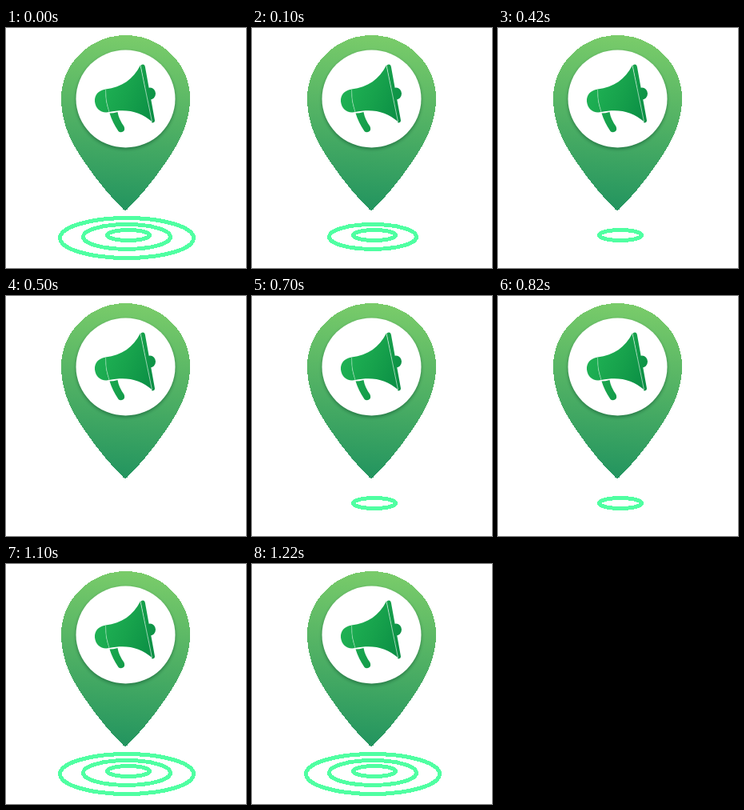
An HTML page with a canvas that plays this animation: 300x300 px, repeating every 1.3 s.

```html
<!DOCTYPE html>
<html lang="en">
<head>
<meta charset="utf-8">
<title>Map pin pulse</title>
<style>
  html, body { margin: 0; width: 100%; height: 100%; overflow: hidden; background: #fff; }
  canvas { display: block; width: 300px; height: 300px; }
</style>
</head>
<body>
<canvas id="stage" width="300" height="300"></canvas>
<script>
const SIZE = 300;
const LOOP = 1300;
const ctx = document.getElementById('stage').getContext('2d', { willReadFrequently: true });

const RINGS = [
  { x: 153, y: 259, rx: 26.5, ry: 6.5 },
  { x: 151, y: 261, rx: 54.5, ry: 15.5 },
  { x: 151, y: 262.5, rx: 83.5, ry: 25 }
];

const PIN = new Path2D(
  'M149.5 9 C194 9 230 45 230 88 C230 112 221 134 210 152 ' +
  'C192 181 172 206 151 227 Q149 229 147 227 ' +
  'C126 206 106 181 88 152 C77 134 69 112 69 88 C69 45 105 9 149.5 9 Z');
const BELL = new Path2D(
  'M124.5 76.5 C145 74 159 64 168 46.5 L183 117.5 C168 104 150 100.5 129 105 Q124 91 124.5 76.5 Z');
const BACK = new Path2D(
  'M124.8 76.5 C115 78 110.5 84 111 92 C112 101 119 107 129 105 Q123.5 91 124.8 76.5 Z');
const RIM = new Path2D(
  'M168.5 48 Q168 46 170 45.7 Q173 45 173.8 48 L186 115.5 Q186 118.5 182.5 118.5 Z');
const HANDLE = new Path2D(
  'M129.5 106.5 Q134 106.5 139.5 105 Q141 114 147.5 123 Q149 127 147 129 Q143 131.5 140.5 129 Q133 118 129.5 106.5 Z');

function gradient(x0, y0, x1, y1, colors) {
  const g = ctx.createLinearGradient(x0, y0, x1, y1);
  colors.forEach((color, i) => g.addColorStop(i / (colors.length - 1), color));
  return g;
}

const pinFill = gradient(160, 9, 140, 228, ['#7acc6a', '#4fb064', '#22945f']);
const hornFill = gradient(115, 75, 185, 105, ['#1fb254', '#17a24c', '#0b8f45']);

function ellipse(x, y, rx, ry) {
  ctx.beginPath();
  ctx.ellipse(x, y, rx, ry, 0, 0, Math.PI * 2);
}

function drawPin() {
  ctx.fillStyle = pinFill;
  ctx.fill(PIN);

  ctx.save();
  ctx.shadowColor = 'rgba(0, 60, 30, 0.45)';
  ctx.shadowBlur = 4;
  ctx.shadowOffsetY = 2;
  ctx.fillStyle = '#fff';
  ellipse(149.5, 88.5, 62, 61);
  ctx.fill();
  ctx.restore();
}

function drawMegaphone() {
  ctx.fillStyle = hornFill;
  ellipse(180, 82, 7, 7.5);
  ctx.fill();
  [BELL, BACK, RIM, HANDLE].forEach(part => ctx.fill(part));

  ctx.strokeStyle = 'rgba(255, 255, 255, 0.7)';
  ctx.lineWidth = 0.8;
  ctx.beginPath();
  ctx.moveTo(168.3, 48);
  ctx.lineTo(182.5, 117);
  ctx.stroke();

  ctx.strokeStyle = 'rgba(255, 255, 255, 0.4)';
  ctx.beginPath();
  ctx.moveTo(124.5, 77);
  ctx.quadraticCurveTo(124, 91, 129, 105);
  ctx.stroke();
}

function drawRings(count) {
  ctx.strokeStyle = '#50ffa2';
  ctx.lineWidth = 5;
  for (const { x, y, rx, ry } of RINGS.slice(0, count)) {
    ellipse(x, y, rx, ry);
    ctx.stroke();
  }
}

// Outer silhouettes are crisp: every pixel is fully opaque or fully clear.
function hardenEdges() {
  const image = ctx.getImageData(0, 0, SIZE, SIZE);
  for (let i = 3; i < image.data.length; i += 4) {
    image.data[i] = image.data[i] < 128 ? 0 : 255;
  }
  ctx.putImageData(image, 0, 0);
}

function ringCount(time) {
  const step = Math.floor((time % LOOP + 100) / 200);
  return Math.abs(3 - step);
}

function render(now) {
  ctx.clearRect(0, 0, SIZE, SIZE);
  drawPin();
  drawRings(ringCount(now));
  hardenEdges();
  drawMegaphone();
  requestAnimationFrame(render);
}

render(performance.now());
</script>
</body>
</html>
```
